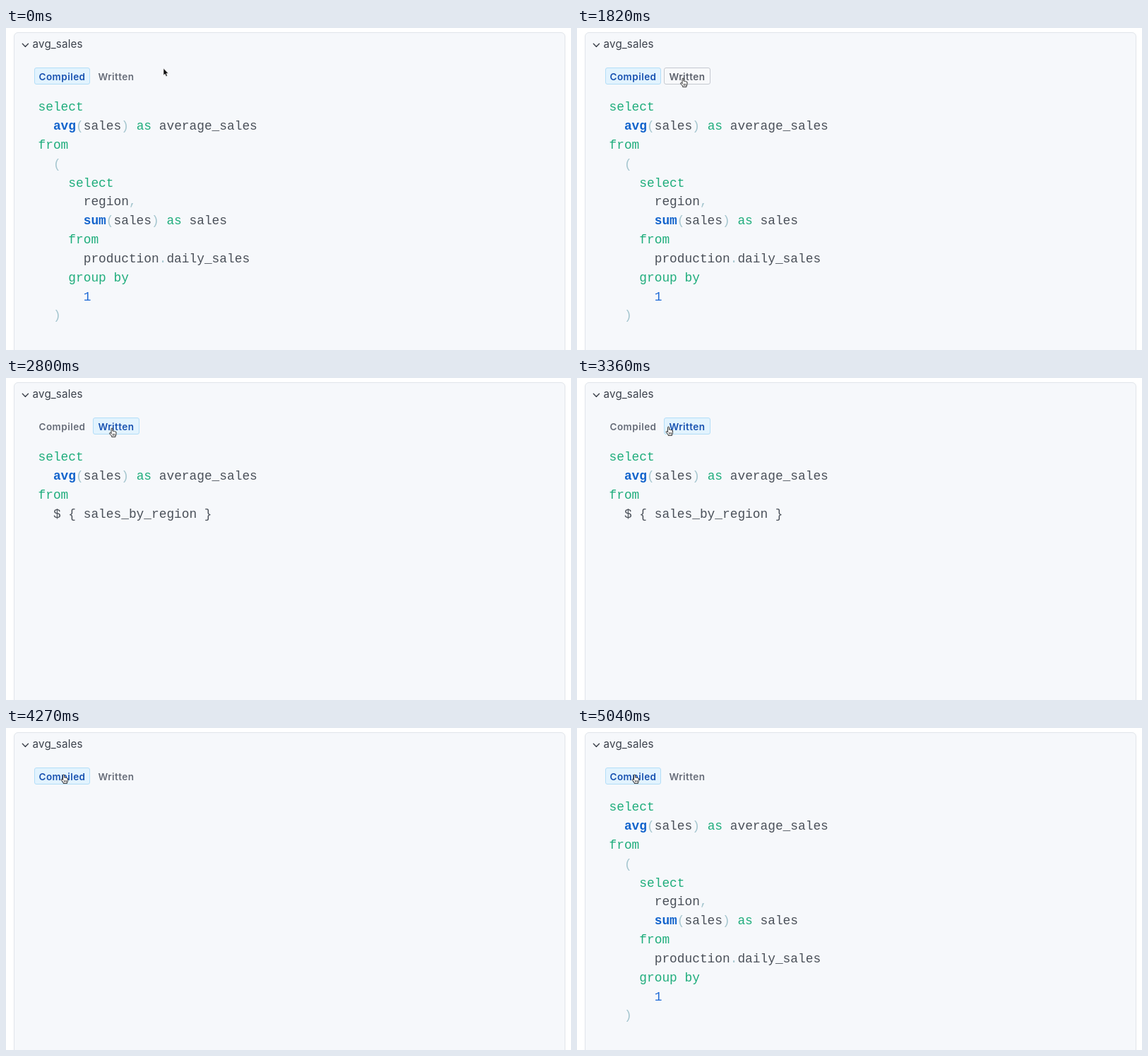
Recreate the animation shown at these times as an HTML page. Size 800 by 456 pixels, loop 5110 ms.

```html
<!DOCTYPE html>
<html lang="en">
<head>
<meta charset="utf-8">
<title>Query viewer</title>
<style>
html, body { margin: 0; width: 100%; height: 100%; overflow: hidden; background: #fff; }
#stage { position: relative; width: 800px; height: 456px; overflow: hidden; }
#stage > * { position: absolute; }
.panel {
  left: 11px; top: 6px; width: 779px; height: 470px;
  background: #f6f8fb; border: 1px solid #e0e4ea; border-radius: 6px;
}
.title { left: 37.6px; top: 12px; font: 15.2px/21px Inter, sans-serif; color: #3b414b; letter-spacing: .12px; }
.tab {
  top: 56px; height: 22px;
  border: 1px solid transparent; border-radius: 3px;
  font: 600 13.5px/25px Inter, sans-serif; letter-spacing: .47px;
  color: #666c78; text-align: center; white-space: nowrap;
}
#compiled { left: 40px; width: 77px; }
#written { left: 123px; width: 64px; }
.tab.hover { border-color: #c5c9d0; background: #f8f9fb; color: #5b606b; }
.tab.active { border-color: #b3def8; background: #e2f3fe; color: #1751b0; }
.code {
  left: 45.5px; top: 99.4px; margin: 0;
  font: 17.83px/26.82px "Liberation Mono", monospace; color: #4a5059;
}
.code i { font-style: normal; color: #1fad7c; }
.code b { color: #1263cc; }
.code s { text-decoration: none; color: #a5c6cf; }
.code u { text-decoration: none; color: #1f6bd6; }
svg { left: 0; top: 0; overflow: visible; }
</style>
</head>
<body>
<div id="stage">
  <div class="panel"></div>
  <div class="title">avg_sales</div>
  <div class="tab" id="compiled">Compiled</div>
  <div class="tab" id="written">Written</div>
  <pre class="code" id="full"><i>select</i>
  <b>avg</b><s>(</s>sales<s>)</s> <i>as</i> average_sales
<i>from</i>
  <s>(</s>
    <i>select</i>
      region<s>,</s>
      <b>sum</b><s>(</s>sales<s>)</s> <i>as</i> sales
    <i>from</i>
      production<s>.</s>daily_sales
    <i>group by</i>
      <u>1</u>
  <s>)</s></pre>
  <pre class="code" id="short"><i>select</i>
  <b>avg</b><s>(</s>sales<s>)</s> <i>as</i> average_sales
<i>from</i>
  $ { sales_by_region }</pre>
  <svg width="800" height="456" fill="none">
    <path d="M23.3 22.2l4.1 4.2 4.1-4.2" stroke="#3b414b" stroke-width="1.4" stroke-linecap="round" stroke-linejoin="round"/>
    <path id="arrow" d="M0 0V9.6L2.1 7.7 3.7 11.2 5.4 10.5 3.9 7H6.8Z" fill="#111" stroke="#fff" stroke-width=".5"/>
    <g id="hand" stroke="#222" stroke-width=".95" stroke-linejoin="round" stroke-linecap="round">
      <path d="M-1 6.8V1.1a1 1 0 0 1 2 0V4.2q1.1-.6 1.8.3 1.1-.5 1.7.4 1.4-.3 1.5 1.1V8.5q0 1.7-1 2.6V12.4H-.4V11.2L-3.3 7.8q-.5-1 .5-1.3.7-.1 1.8 1Z" fill="#fff"/>
      <path d="M.9 8.2v2.3M2.5 8.2v2.3M4.1 8.2v2.3" stroke-width=".7"/>
    </g>
  </svg>
</div>
<script>
const LOOP = 5110, STEP = 70, FADE = 420;
const TO_WRITTEN = 2310, TO_COMPILED = 4270;
const $ = id => document.getElementById(id);

// pointer tip: time, x, y
const path = [
  [0, 223, 57.3], [700, 223, 57.3], [910, 204, 60.8], [1540, 150, 71],
  [3220, 150, 71], [3500, 109, 67], [3780, 91.5, 66], [4060, 81.5, 66], [LOOP, 81.5, 66]
];

function pointer(t) {
  const i = path.findIndex(p => p[0] > t);
  const [t0, x0, y0] = path[i - 1], [t1, x1, y1] = path[i];
  const k = (t - t0) / (t1 - t0);
  return [x0 + (x1 - x0) * k, y0 + (y1 - y0) * k];
}

function fadeIn(t, start) {
  const k = Math.min(1, Math.max(0, (t - start) / FADE));
  return k * k * (3 - 2 * k);
}

function draw(now) {
  const t = Math.floor(now % LOOP / STEP) * STEP;
  const [x, y] = pointer(t);
  const written = t >= TO_WRITTEN && t < TO_COMPILED;
  const overWritten = x > 122 && x < 188, overCompiled = x < 119;

  $("compiled").className = "tab" + (!written ? " active" : overCompiled ? " hover" : "");
  $("written").className = "tab" + (written ? " active" : overWritten ? " hover" : "");
  $("full").style.opacity = written ? 0 : t < TO_WRITTEN ? 1 : fadeIn(t, TO_COMPILED);
  $("short").style.opacity = written ? fadeIn(t, TO_WRITTEN) : 0;

  const onTab = overWritten || overCompiled;
  for (const [id, on] of [["arrow", !onTab], ["hand", onTab]]) {
    $(id).setAttribute("transform", `translate(${x} ${y})`);
    $(id).style.display = on ? "" : "none";
  }
}

const start = performance.now();
function tick() {
  draw(performance.now() - start);
  requestAnimationFrame(tick);
}
tick();
</script>
</body>
</html>
```
